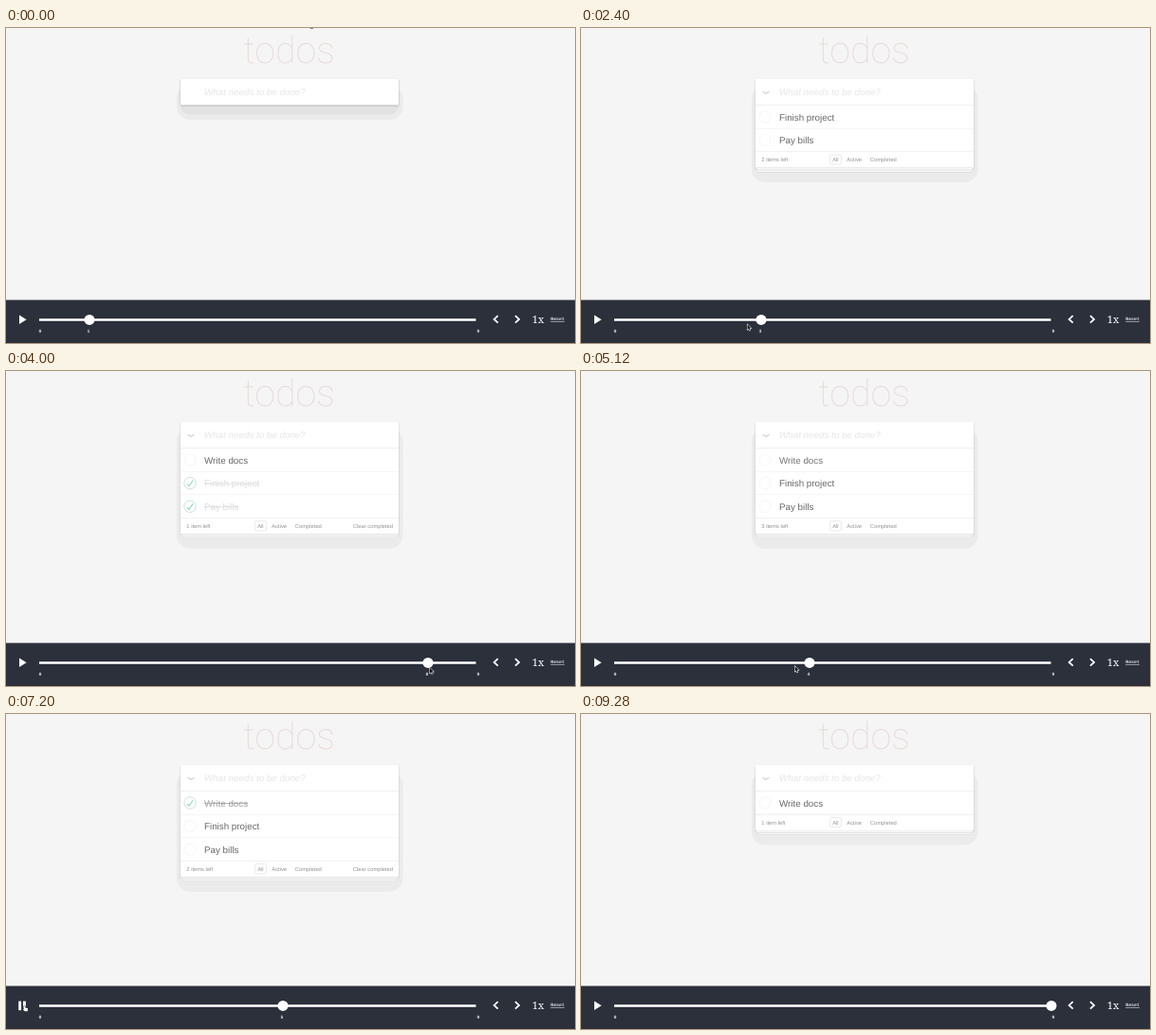
Write an HTML page with a canvas that moves like this. It is 600 by 333 pixels and loops after 9.76 s.

```html
<!DOCTYPE html>
<html lang="en">
<head>
<meta charset="utf-8">
<title>todos</title>
<style>
  html, body { margin: 0; width: 100%; height: 100%; overflow: hidden; background: #f5f5f5; }
  canvas { display: block; }
</style>
</head>
<body>
<canvas width="600" height="333"></canvas>
<script>
const ctx = document.querySelector('canvas').getContext('2d');
ctx.textRendering = 'geometricPrecision';
const LOOP = 9760, TICK = 160, FADE = 400, ROW = 24.6;
const SANS = '"Liberation Sans", Arial, sans-serif';
const MONO = '"Liberation Mono", monospace';

// Todo list at each slider step; a lower-case letter is a completed item.
const LISTS = ['', '', 'P', 'FP', 'WFP', 'wFP', 'WFP', 'WfP', 'Wfp', 'W'];
const TITLES = { W: 'Write docs', F: 'Finish project', P: 'Pay bills' };

// Turning points of the pointer: [time, x, y]
const POINTER = [
  [400, 319, -6], [1120, 92, 324], [1900, 94, 307], [2080, 134, 312], [2300, 134, 312],
  [2700, 300, 318], [2980, 310, 319], [3040, 418, 319], [3400, 425, 320], [3640, 482, 317],
  [3840, 482, 316], [4000, 447, 314], [5300, 190, 312], [5700, 190, 312], [6000, 120, 321],
  [6400, 18, 308], [8600, 18, 308], [9120, 290, 17]
];

const ease = p => 1 - (1 - p ** 1.35) ** 3;
const lerp = (a, b, p) => a + (b - a) * p;
const knobX = step => 37 + 51 * step;

function pointerAt(time) {
  const i = POINTER.findIndex(key => key[0] >= time);
  if (i < 0) return null;
  const b = POINTER[i], a = POINTER[i - 1] || b;
  const p = a === b ? 0 : (time - a[0]) / (b[0] - a[0]);
  return [lerp(a[1], b[1], p), lerp(a[2], b[2], p)];
}

// The knob rests, follows the drag, then plays one step every 480 ms.
function stepAt(time) {
  if (time < 2000) return 1;
  if (time < 5600) return Math.round((pointerAt(time)[0] - 6 - knobX(0)) / 51);
  return Math.min(9, 3 + Math.max(0, Math.floor((time - 6120) / 480)));
}

const CHANGES = [];
for (let t = 0; t < LOOP; t += 5) {
  if (!t || stepAt(t) !== stepAt(t - 5)) CHANGES.push([t, stepAt(t)]);
}

// 0 = open, 1 = completed, fading after each toggle; a new item starts settled.
function fadeAt(item, time) {
  let from = 0, to = 0, since = 0, present = false;
  const value = now => lerp(from, to, ease(Math.min(1, (now - since) / FADE)));
  for (const [start, step] of CHANGES) {
    if (start > time) break;
    const list = LISTS[step];
    const done = +list.includes(item.toLowerCase());
    if (!present || done !== to) {
      from = present ? value(start) : done;
      to = done;
      since = start;
    }
    present = done || list.includes(item);
  }
  return value(time);
}

function text(str, x, y, font, color, align = 'left') {
  ctx.font = font;
  ctx.fillStyle = color;
  ctx.textAlign = align;
  ctx.fillText(str, x, y);
  return ctx.measureText(str).width;
}

function rect(x, y, w, h, color, radius = 0) {
  ctx.fillStyle = color;
  ctx.beginPath();
  ctx.roundRect(x, y, w, h, radius);
  ctx.fill();
}

function path(d, x, y, fill, stroke, width = 1, scale = 1) {
  const p = new Path2D(d);
  ctx.save();
  ctx.translate(x, y);
  ctx.scale(scale, scale);
  ctx.lineWidth = width;
  if (stroke) { ctx.strokeStyle = stroke; ctx.stroke(p); }
  if (fill) { ctx.fillStyle = fill; ctx.fill(p); }
  ctx.restore();
}

function circle(x, y, r, fill, stroke) {
  ctx.beginPath();
  ctx.arc(x, y, r, 0, Math.PI * 2);
  if (fill) { ctx.fillStyle = fill; ctx.fill(); }
  if (stroke) { ctx.strokeStyle = stroke; ctx.lineWidth = 0.8; ctx.stroke(); }
}

function drawCard(list, time) {
  const count = list.length;
  const bottom = 81.5 + (count ? ROW * count + 17 : 0);
  rect(180, 61, 238.5, bottom - 45.5, '#ebebeb', 14);
  if (!count) rect(184, 66, 230, bottom - 56, '#e2e2e2', 9);
  ctx.save();
  ctx.shadowColor = `rgba(0,0,0,${count ? 0.2 : 0.3})`;
  ctx.shadowBlur = 2;
  ctx.shadowOffsetY = 0.8;
  rect(184, 54, 230, bottom - 54, '#fff');
  ctx.restore();
  for (let i = count ? 2 : 0; i > 0; i--) {
    const x = 184 + 1.2 * i, w = 230 - 2.4 * i, y = bottom + 2.1 * i;
    rect(x, y - 2, w, 2.5, '#d4d4d4');
    rect(x, y - 2, w, 2, '#f8f8f8');
  }

  text('What needs to be done?', 209, 71.3, `italic 9.8px ${SANS}`, '#e6e6e6');
  if (!count) return;
  path('M-3.5 -1.2 L0 1 L3.5 -1.2', 195, 68.3, null, '#d8d8d8', 1.4);
  [...list].forEach((item, i) => drawRow(item, 94 + ROW * i, time));
  drawFooter(list, bottom);
}

function drawRow(item, y, time) {
  const key = item.toUpperCase(), done = item !== key;
  const level = Math.round(lerp(0x68, 0xdc, fadeAt(key, time)));
  const color = `rgb(${level},${level},${level})`;
  rect(184, y - 12.7, 230, 0.6, '#ebebeb');
  circle(194, y, 6.2, null, done ? '#bddad5' : '#f3f3f3');
  const width = text(TITLES[key], 209, y + 3.6, `9.8px ${SANS}`, color);
  if (!done) return;
  rect(209, y + 0.1, width, 0.7, color);
  path('M2.7 -3.1 L-1 2.6 L-2.9 .75 L-3.4 1.2 L-.9 3.7 L3.3 -2.7Z', 194, y, '#5dc2af');
}

function drawFooter(list, bottom) {
  const y = bottom - 6.3, font = `5.8px ${SANS}`, color = '#939393';
  const left = list.replace(/[a-z]/g, '').length;
  rect(184, bottom - 17.3, 230, 0.6, '#e6e6e6');
  text(`${left} item${left === 1 ? '' : 's'} left`, 190.3, y, font, color);
  ctx.strokeStyle = '#e4dede';
  ctx.lineWidth = 0.7;
  ctx.beginPath();
  ctx.roundRect(262.6, bottom - 13.7, 11.8, 10.2, 1);
  ctx.stroke();
  text('All', 265.2, y, font, color);
  text('Active', 280.3, y, font, color);
  text('Completed', 304.8, y, font, color);
  if (/[a-z]/.test(list)) text('Clear completed', 408, y, font, color, 'right');
}

function drawPlayer(step, playing) {
  rect(0, 287.5, 600, 46, '#2b303b');
  if (playing) {
    rect(13.2, 303.6, 2.9, 9.6, '#fff');
    rect(18, 303.6, 2.9, 9.6, '#fff');
  } else {
    path('M0 -4.8 L7.6 0 L0 4.8Z', 14, 308.2, '#fff');
  }

  rect(35, 307.2, 460.5, 2.6, '#fff');
  circle(knobX(step), 308.4, 5.5, '#fff');
  for (const n of new Set([0, step, 9])) {
    text(n, n === 9 ? 498 : knobX(n) - 1, 322.4, `bold 4.9px ${MONO}`, '#e4e4e6', 'center');
  }

  path('M2 -3.8 L-2 0 L2 3.8', 516.7, 307.9, null, '#fff', 1.8);
  path('M-2 -3.8 L2 0 L-2 3.8', 539, 307.9, null, '#fff', 1.8);
  text('1x', 554.8, 311.8, '11px "Noto Serif", serif', '#fff');
  const width = text('Reset', 574.2, 309.4, `bold 4.9px ${MONO}`, '#dcdde0');
  rect(574.2, 310.1, width, 0.6, '#dcdde0');
}

function drawPointer(time) {
  const tip = pointerAt(time);
  if (!tip) return;
  const [x, y] = tip;
  const overControl = x < 30 || (time < 2000 && y < 310);
  if (overControl) {
    path('M0 0 L1 0 L1 2 L4 2.6 L3.7 5.8 L.9 5.8 L-1.2 3.4 L0 3.2Z', x + 1, y + 0.5, '#fff', '#333', 1);
  } else {
    path('M0 0 L0 5.8 L1.3 4.7 L2.3 7 L3.3 6.5 L2.4 4.3 L4.2 4.2Z', x, y, '#111', '#eee', 1.2, 0.9);
  }
}

function draw() {
  const time = Math.floor(performance.now() % LOOP / TICK) * TICK;
  const step = stepAt(time);
  rect(0, 0, 600, 333, '#f5f5f5');
  text('todos', 298.5, 37, '100 39.4px Roboto, sans-serif', 'rgba(175,80,80,.16)', 'center');
  drawCard(LISTS[step], time);
  drawPlayer(step, time >= 6720 && time < 9280);
  drawPointer(time);
  requestAnimationFrame(draw);
}
draw();
</script>
</body>
</html>
```
